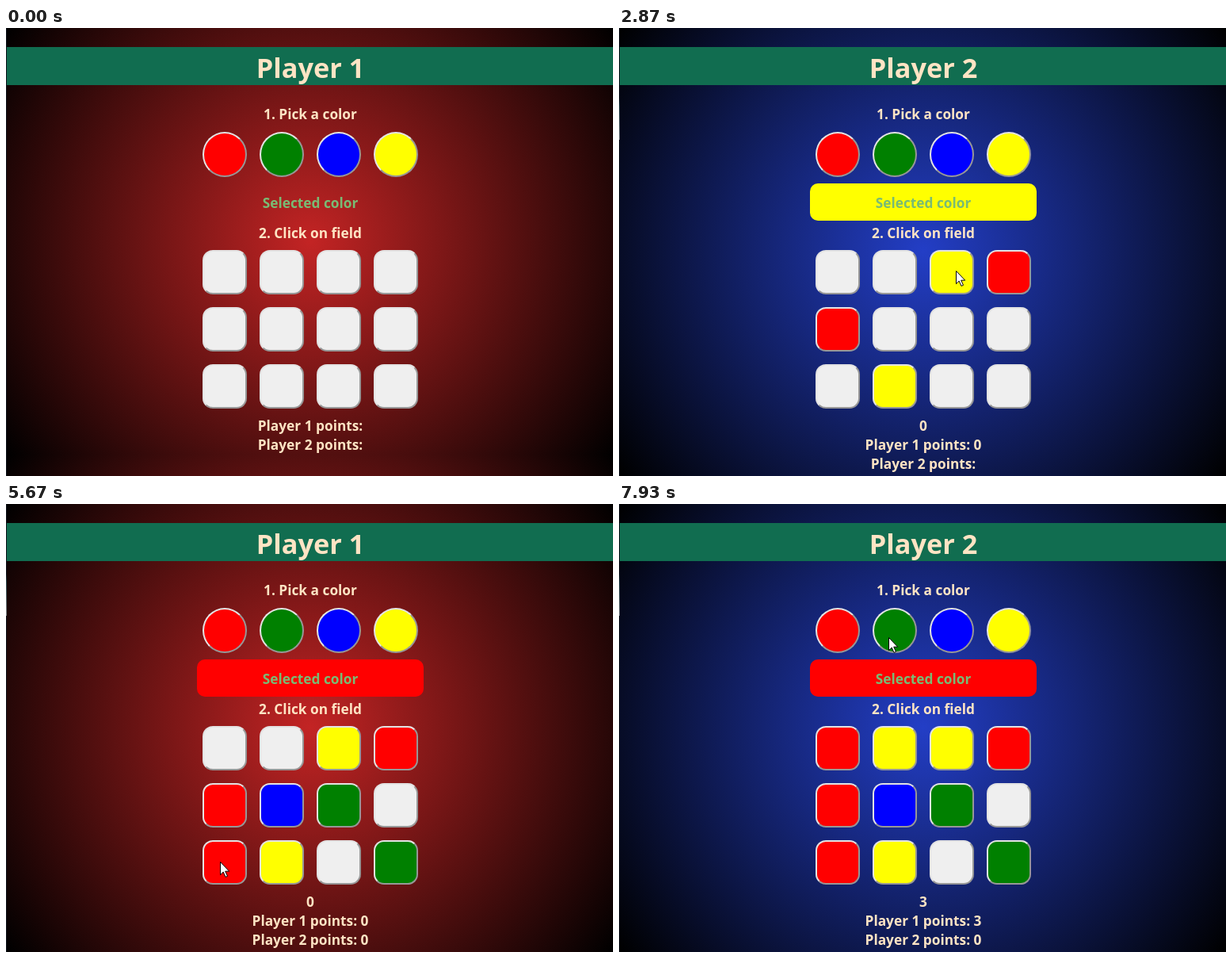
These frames come from a looping animation (766x565 px, 8 s). An HTML page:

```html
<!DOCTYPE html>
<html lang="en">
<head>
<meta charset="utf-8">
<title>Color game</title>
<style>
  html, body { margin: 0; width: 100%; height: 100%; overflow: hidden; background: #000; }
  #stage {
    position: absolute; left: 0; top: 0; width: 766px; height: 565px; overflow: hidden;
    background: radial-gradient(circle, var(--glow), #000) 1px 0 / 766px var(--page);
  }
  #stage > * { position: absolute; box-sizing: border-box; }
  #edge { left: 0; top: 0; width: 1px; height: 565px; background: #11161e; }
  #edge.lit { background: linear-gradient(#11161e 88px, #2b4a50 98px, #8d9396 141px, #11161e 141px); }
  #header { left: 1px; top: 24px; width: 765px; height: 48px; background: #116d50; }
  #bar { left: 241px; top: 196px; width: 286px; height: 47px; border-radius: 10px; }
  .button {
    width: 56px; height: 56px; border: 2px solid; border-radius: 13px;
    border-color: #e3e3e3 #979797 #979797 #e3e3e3;
  }
  .round { height: 57px; border-radius: 50%; }
  .pressed { border-color: #979797 #e3e3e3 #e3e3e3 #979797; }
  svg { left: 0; top: 0; }
  text { font: 700 17.3px "Open Sans", "Noto Sans", sans-serif; fill: #ffe4c4; text-anchor: middle; }
  #title { font-size: 34.3px; }
  #selected { fill: #79bb74; }
</style>
</head>
<body>
<div id="stage">
  <div id="edge"></div>
  <div id="header"></div>
  <div id="bar"></div>
  <svg id="overlay" width="766" height="565">
    <text id="title" x="384" y="63"></text>
    <text x="384" y="115">1. Pick a color</text>
    <text id="selected" x="384" y="227">Selected color</text>
    <text x="384" y="265">2. Click on field</text>
    <text id="line0" x="384" y="508"></text>
    <text id="line1" x="384" y="532"></text>
    <text id="line2" x="384" y="556"></text>
    <path id="cursor" d="M.5 .5v16.2l3.7-3.6 2.8 6.3 2.5-1.1-2.8-6.1h5z" fill="#fff" stroke="#000"/>
  </svg>
</div>
<script>
const FPS = 15, TICKS = 8 * FPS;
const $ = id => document.getElementById(id);
const colors = ["red", "green", "blue", "yellow"];
const colorOf = letter => colors.find(color => color[0] === letter) || "#efefef";

function addButton(col, y, kind) {
  const button = document.createElement("div");
  button.className = "button " + kind;
  button.style.left = 248 + col * 72 + "px";
  button.style.top = y + "px";
  $("stage").insertBefore(button, $("overlay"));
  return button;
}

const pickers = colors.map((color, i) => {
  const button = addButton(i, 131, "round");
  button.style.background = color;
  return button;
});
const fields = Array.from({ length: 12 }, (_, i) =>
  addButton(i % 4, 280 + Math.floor(i / 4) * 72, ""));

// Board before each turn, row by row; a field click starts the next turn.
const turns = [
  { board: "............", points: ["", ""] },
  { board: "..yrr....y..", points: [" 0", ""], gained: "0" },
  { board: "..yrrbg.ry.g", points: [" 0", " 0"], gained: "0" },
  { board: "ryyrrbg.ry.g", points: [" 3", " 0"], gained: "3" }
];

// All times are in ticks of 1/15 s.
const clicks = [
  { button: pickers[3], down: 25, up: 28 },
  { button: fields[2], down: 40, up: 43 },
  { button: pickers[0], down: 72, up: 74 },
  { button: fields[8], down: 83, up: 85 },
  { button: fields[0], down: 100, up: 102 }
];

// Each leg continues from the end of the one before; bend bows it to the right.
const entry = { from: 13, x: 591, y: 237 };
const legs = [
  { from: 13, to: 20, x: 465, y: 162 },
  { from: 21, to: 23, x: 480, y: 151 },
  { from: 27, to: 35, x: 424, y: 339 },
  { from: 36, to: 39, x: 425, y: 306 },
  { from: 52, to: 59, x: 411, y: 306 },
  { from: 62, to: 70, x: 278, y: 169 },
  { from: 73, to: 81, x: 270, y: 451, bend: 56 },
  { from: 93, to: 98, x: 281, y: 302 },
  { from: 110, to: 119, x: 340, y: 168 }
];
const easeOut = k => k * (2 - k);

function pointerAt(tick) {
  let { x, y } = entry;
  for (const leg of legs.filter(leg => leg.from <= tick)) {
    const k = easeOut(Math.min(1, (tick - leg.from) / (leg.to - leg.from)));
    x += (leg.x - x) * k + (leg.bend || 0) * Math.sin(Math.PI * k);
    y += (leg.y - y) * k;
  }
  return [Math.round(x), Math.round(y)];
}

function draw(tick) {
  const done = clicks.filter(click => click.up <= tick).map(click => click.button);
  const turnIndex = done.filter(button => fields.includes(button)).length;
  const picked = done.filter(button => pickers.includes(button)).pop();
  const { board, points, gained } = turns[turnIndex];
  const player = turnIndex % 2 + 1;

  const lines = points.map((score, i) => `Player ${i + 1} points:${score}`);
  if (gained) lines.unshift(gained);
  for (let i = 0; i < 3; i++) $("line" + i).textContent = lines[i] || "";
  $("title").textContent = "Player " + player;
  $("stage").style.setProperty("--glow", player === 1 ? "#c32424" : "#233ec6");
  $("stage").style.setProperty("--page", 490 + 24 * lines.length + "px");

  fields.forEach((field, i) => { field.style.background = colorOf(board[i]); });
  $("bar").style.background = picked ? picked.style.background : "none";
  $("edge").classList.toggle("lit", tick > clicks[0].down);
  for (const { button, down, up } of clicks)
    button.classList.toggle("pressed", tick >= down && tick < up);

  $("cursor").style.display = tick < entry.from ? "none" : "";
  $("cursor").setAttribute("transform", `translate(${pointerAt(tick)})`);
}

const start = performance.now();
let shown = -1;
function frame() {
  // The small lead absorbs rounding at tick boundaries.
  const elapsed = performance.now() - start + 4;
  const tick = Math.floor(elapsed * FPS / 1000) % TICKS;
  if (tick !== shown) draw(shown = tick);
  requestAnimationFrame(frame);
}
frame();
</script>
</body>
</html>
```
